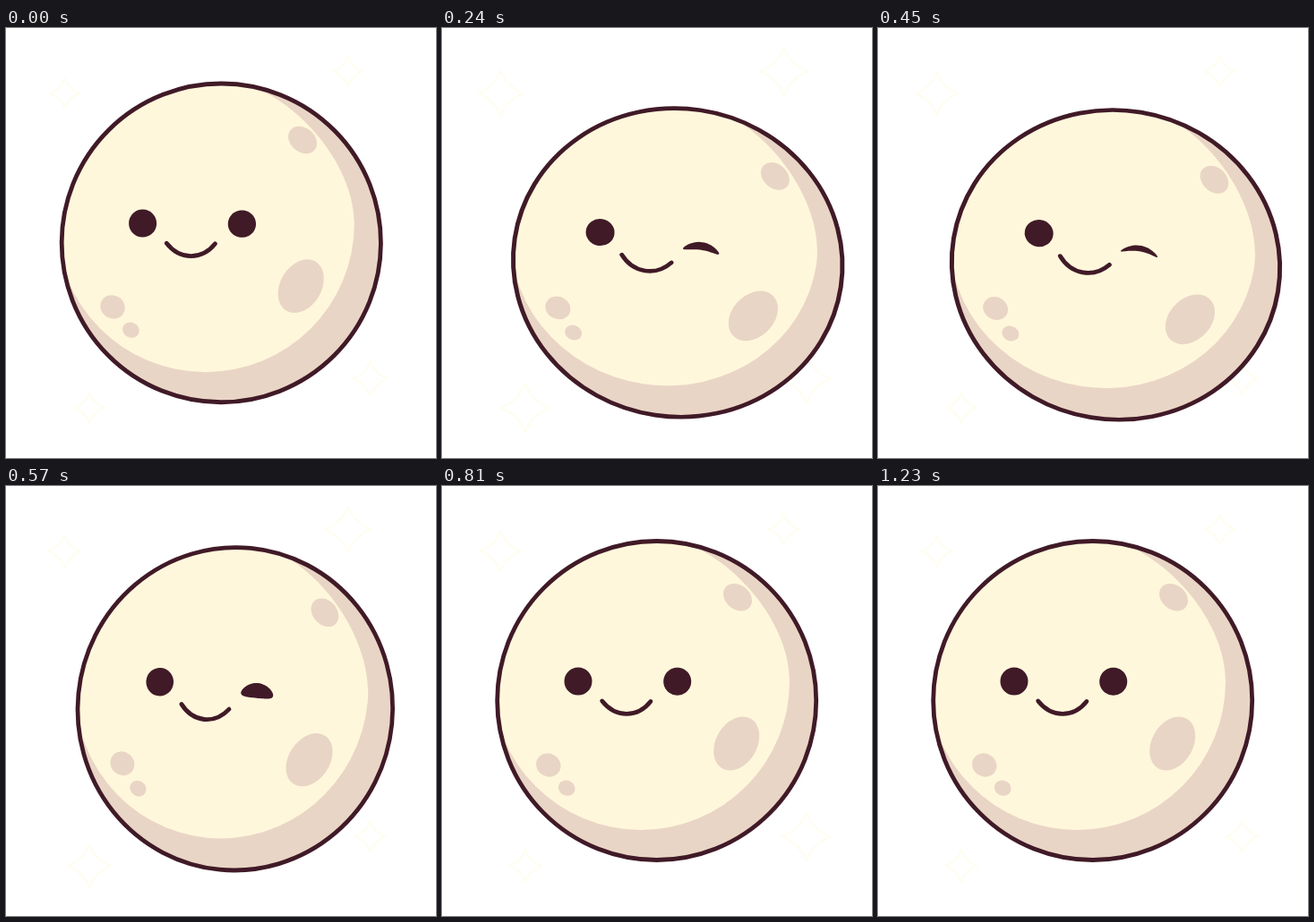
An HTML page for the animation above (1260 ms loop, 480 by 480 pixels).

```html
<!DOCTYPE html>
<html lang="en">
<head>
<meta charset="utf-8">
<title>Winking moon</title>
<style>
html, body { margin: 0; width: 100%; height: 100%; overflow: hidden; background: #fff; }
svg { display: block; width: 100vw; height: 100vh; }
.spark { fill: none; stroke: #fffdef; stroke-width: 2; stroke-linejoin: round; }
.line { fill: none; stroke: #401a27; stroke-width: 4.8; stroke-linecap: round; }
.dark { fill: #401a27; }
.shade { fill: #e9d5c5; }
.light { fill: #fff7dc; }
</style>
</head>
<body>
<svg viewBox="0 0 480 480">
  <defs><clipPath id="disc"><circle r="177"/></clipPath></defs>
  <g id="sparks"></g>
  <g id="moon">
    <circle class="shade" r="177"/>
    <path class="light" clip-path="url(#disc)" d="M36-174C92-152 148.3-84 148.3-21.5A166 166 0 0 1-183.7-21.5V-183H36Z"/>
    <g class="shade">
      <ellipse rx="17.5" ry="13.5" transform="translate(90.3 -115.3) rotate(40)"/>
      <ellipse rx="32" ry="23" transform="translate(89 48) rotate(-60)"/>
      <ellipse rx="14" ry="12.8" transform="translate(-120.9 72) rotate(30)"/>
      <ellipse rx="9.6" ry="8.4" transform="translate(-100.5 97.7) rotate(25)"/>
    </g>
    <circle class="line" r="178"/>
    <circle class="dark" cx="-87.7" cy="-21.5" r="15.5"/>
    <path class="dark" id="eye" transform="translate(23 -21.3)"/>
    <path class="line" d="M-61 .5C-46 19.5-21.5 19.5-6.8 1"/>
  </g>
</svg>
<script>
const LOOP = 1260, STEP = 30;
const byId = id => document.getElementById(id);
const moon = byId('moon'), eye = byId('eye');

// Centre and moment of greatest size; the twinkle rates alternate.
const sparks = [[65.5, 73, 325], [381.5, 48.5, 205], [406.5, 391.5, 210], [93, 424, 225]]
  .map(([x, y, peak], i) => {
    const el = document.createElementNS('http://www.w3.org/2000/svg', 'path');
    el.setAttribute('class', 'spark');
    byId('sparks').append(el);
    return { el, x, y, peak, period: LOOP / (2 + i % 2) };
  });

// Smooth rise from 0 to 1 between two times.
function rise(t, from, to) {
  const s = Math.min(1, Math.max(0, (t - from) / (to - from)));
  return s * s * (3 - 2 * s);
}

// A circle that flattens into a thin arched lens.
function eyePath(shut) {
  const mix = (a, b) => a + (b - a) * shut;
  const points = [];
  for (let a = 0; a < 2 * Math.PI; a += Math.PI / 30) {
    const c = Math.cos(a), s = Math.sin(a);
    points.push((mix(15.5, 20.5) * c).toFixed(2) + ' '
      + (mix(15.5, 2.5) * s + shut * (7 * c * c - 2)).toFixed(2));
  }
  return `M${points.join('L')}Z`;
}

function sparkPath(x, y, r) {
  const q = r * .27;
  return `M${x} ${y - r}Q${x + q} ${y - q} ${x + r} ${y}Q${x + q} ${y + q} ${x} ${y + r}`
    + `Q${x - q} ${y + q} ${x - r} ${y}Q${x - q} ${y - q} ${x} ${y - r}Z`;
}

function draw(t) {
  // The wink starts one step before the loop wraps.
  const u = (t + STEP) % LOOP;
  const out = rise(u, 0, 360);
  const wink = out - rise(u, 420, 810);
  const squash = .04 * out - .065 * rise(u, 420, 670) + .025 * rise(u, 670, 810);
  const bow = wink * (1 - wink);
  const x = 239.7 + 27.3 * wink + 3.6 * bow;
  const y = 239.5 + 23.3 * wink + 118 * squash - 9 * bow;
  moon.setAttribute('transform',
    `translate(${x} ${y}) rotate(${10 * wink}) scale(${1 + squash} ${1 - squash})`);
  eye.setAttribute('d', eyePath(wink));
  for (const s of sparks) {
    const r = 22 + 5.5 * Math.cos(2 * Math.PI * (t - s.peak) / s.period);
    s.el.setAttribute('d', sparkPath(s.x, s.y, r));
  }
}

const start = performance.now();
function tick() {
  const t = (performance.now() - start) % LOOP;
  draw(Math.floor(t / STEP) * STEP);
  requestAnimationFrame(tick);
}
tick();
</script>
</body>
</html>
```
